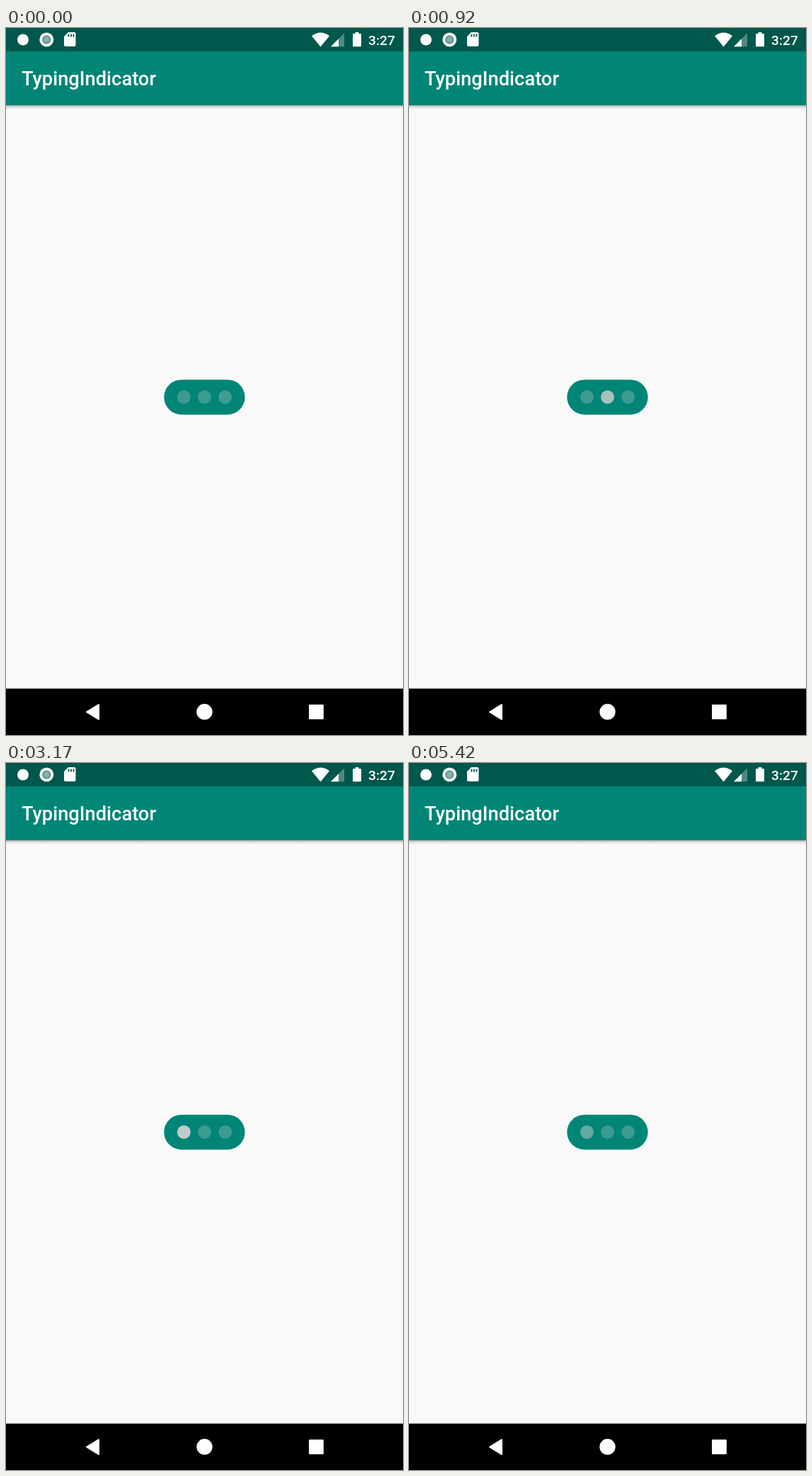
An HTML page that plays this animation: 561 by 998 pixels, repeating every 5460 ms.

```html
<!DOCTYPE html>
<html lang="en">
<head>
<meta charset="utf-8">
<title>Typing indicator</title>
<style>
  html, body { margin: 0; width: 100%; height: 100%; overflow: hidden; background: #f9f9fa; }
  svg { display: block; width: 100vw; height: 100vh; }
  text { font-family: Roboto, sans-serif; font-weight: 500; fill: #fff; }
</style>
</head>
<body>
<svg viewBox="0 0 561 998" xmlns="http://www.w3.org/2000/svg">
  <defs>
    <linearGradient id="shadow" x1="0" y1="0" x2="0" y2="1">
      <stop offset="0" stop-color="#000" stop-opacity=".34"/>
      <stop offset=".4" stop-color="#000" stop-opacity=".12"/>
      <stop offset="1" stop-color="#000" stop-opacity="0"/>
    </linearGradient>
  </defs>
  <rect width="561" height="998" fill="#f9f9fa"/>

  <!-- App bar -->
  <rect y="109" width="561" height="6" fill="url(#shadow)"/>
  <rect y="32" width="561" height="77" fill="#008577"/>
  <text x="22" y="81" font-size="27.3">TypingIndicator</text>

  <!-- Status bar -->
  <rect width="561" height="33" fill="#00574b"/>
  <g fill="#fff">
    <circle cx="24" cy="16.5" r="8"/>
    <circle cx="57.3" cy="16.4" r="10" fill="#f0f3f2"/>
    <circle cx="57.3" cy="16.4" r="6" fill="#5c958b"/>
    <circle cx="57.3" cy="16.4" r="3.8" fill="#8db0aa"/>
    <path d="M88 6H96.500Q98.500 6 98.500 8V24Q98.500 26 96.500 26H84Q82 26 82 24V12Z"/>
    <path d="M88.500 8.500V12.500M92 8.500V12.500M95.500 8.500V12.500" stroke="#00574b" stroke-width="1.8"/>
    <path d="M444.500 26.500L432 11.200Q444.500 2 457 11.200Z"/>
    <path d="M459 26.300L478 7.200V26.300Z" opacity=".3"/>
    <path d="M459 26.300L470 15.200V26.300Z"/>
    <path d="M493.500 6H498.500V8H501Q502 8 502 9V25Q502 26.300 501 26.300H491Q490 26.300 490 25V9Q490 8 491 8H493.500Z"/>
    <text x="512" y="24" font-size="19.2">3:27</text>
  </g>

  <!-- Indicator -->
  <rect x="223.300" y="496.500" width="114.300" height="49.200" rx="24.600" fill="#008577"/>
  <g id="dots" fill="#d0d0d2"></g>

  <!-- Navigation bar -->
  <rect y="932.500" width="561" height="65.500" fill="#000"/>
  <g fill="#fff" stroke="#fff" stroke-width="2" stroke-linejoin="round">
    <path d="M114 965.500L131 955.200V975.800Z"/>
    <circle cx="280.500" cy="965.300" r="10.200"/>
    <rect x="429" y="956" width="18.800" height="18.800"/>
  </g>
</svg>
<script>
const LOOP = 5460;
const SLOT = 415;
const PULSE = 405;
const DIM = 0.29;

const group = document.getElementById("dots");
const dots = [251.4, 280.5, 309.7].map(x => {
  const dot = document.createElementNS(group.namespaceURI, "circle");
  dot.setAttribute("cx", x);
  dot.setAttribute("cy", 521);
  dot.setAttribute("r", 9.5);
  group.append(dot);
  return dot;
});

function draw(time) {
  const slot = Math.floor(time / SLOT);
  const progress = Math.min((time % SLOT) / PULSE, 1);
  const glow = Math.max(0, Math.sin(Math.PI * progress)) ** 0.8;
  // The loop opens on the third dot's pulse.
  const active = (slot + 2) % 3;
  dots.forEach((dot, i) => {
    dot.setAttribute("opacity", i === active ? DIM + (1 - DIM) * glow : DIM);
  });
}

const start = performance.now();
function tick(now) {
  draw(Math.max(0, now - start) % LOOP);
  requestAnimationFrame(tick);
}
draw(0);
requestAnimationFrame(tick);
</script>
</body>
</html>
```
